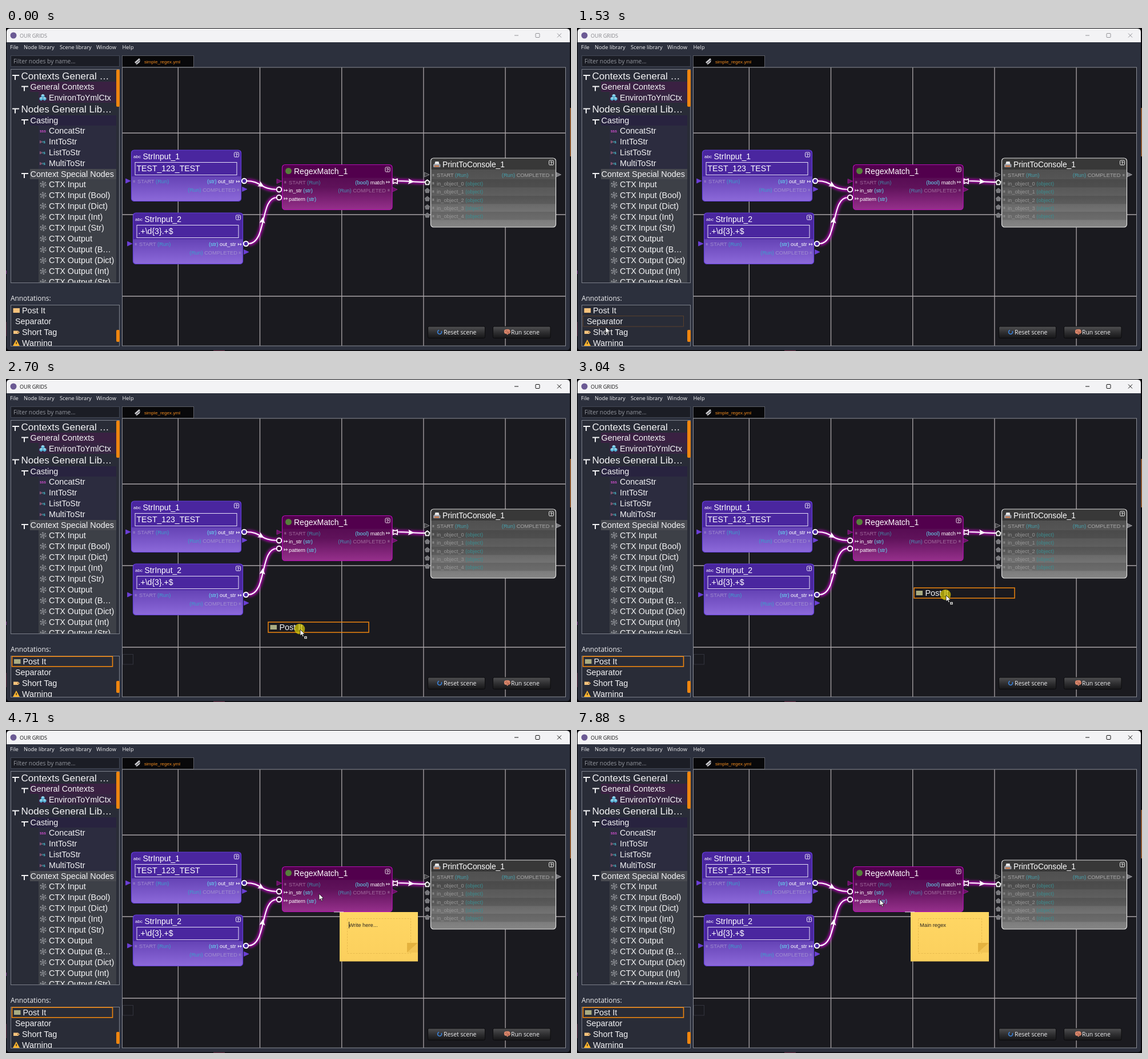
These frames come from a looping animation (989 px wide and 566 px high, 8 s). An HTML page:

```html
<!DOCTYPE html>
<html lang="en">
<head>
<meta charset="utf-8">
<title>Node editor</title>
<style>
  html, body { margin: 0; width: 100%; height: 100%; overflow: hidden; background: #000; }
  svg { display: block; width: 989px; height: 566px; }
  text { font-family: "Liberation Sans", Arial, sans-serif; white-space: pre; }
  .ui { font-family: "Open Sans", "Noto Sans", sans-serif; }
</style>
</head>
<body>
<svg id="stage" viewBox="0 0 989 566" xmlns="http://www.w3.org/2000/svg"></svg>
<script>
const LOOP = 8000, PRESS = 2430, DROP = 3640, FOCUS = 4200;
const stage = document.getElementById('stage');

// Markup helpers
const rect = (x, y, w, h, fill, more = '') =>
  `<rect x="${x}" y="${y}" width="${w}" height="${h}" fill="${fill}" ${more}/>`;
const path = (d, fill = 'none', more = '') => `<path d="${d}" fill="${fill}" ${more}/>`;
const circle = (x, y, r, fill, more = '') => `<circle cx="${x}" cy="${y}" r="${r}" fill="${fill}" ${more}/>`;
const text = (x, y, size, fill, s, more = '') =>
  `<text x="${x}" y="${y}" font-size="${size}" fill="${fill}" ${more}>${s}</text>`;
const ui = (x, y, size, fill, s, more = '') => text(x, y, size, fill, s, 'class="ui" ' + more);
const span = (fill, s) => `<tspan fill="${fill}">${s}</tspan>`;
const at = (x, y, body, more = '') => `<g transform="translate(${x} ${y})" ${more}>${body}</g>`;
const gradient = (id, ...stops) => `<linearGradient id="${id}" x2="0" y2="1">` +
  stops.map((c, i) => `<stop offset="${i / (stops.length - 1)}" stop-color="${c}"/>`).join('') + '</linearGradient>';

const defs = `<defs>
  ${gradient('violet', '#5535a4', '#6442b4', '#8c69da')}
  ${gradient('magenta', '#4e054a', '#5f125a', '#96308c')}
  ${gradient('grey', '#4a4a4a', '#5c5c5c', '#858585')}
  ${gradient('button', '#505052', '#303032', '#161618')}
  ${gradient('paper', '#ffd764', '#fbcf5d')}
  <filter id="glow" x="-60%" y="-60%" width="220%" height="220%" filterUnits="objectBoundingBox">
    <feGaussianBlur stdDeviation="2.6"/></filter>
  <clipPath id="treeClip"><rect x="9" y="73" width="189" height="373"/></clipPath>
</defs>`;

function frame() {
  const menu = [[7, 'File'], [31, 'Node library'], [94, 'Scene library'], [158, 'Window'], [203.5, 'Help']];
  return rect(0, 0, 989, 566, '#08080b') +
    rect(987.5, 140, 1.5, 85, '#b5713c') + rect(0, 425, 1, 6, '#7a2a80') + rect(0, 515, 1, 25, '#4e2030') +
    rect(363, 564.5, 20, 1.5, '#5b2a3c') +
    path('M1 25V7Q1 1 7 1H981Q987 1 987 7V25Z', '#f3f3f5') +
    path('M1 25H987V559Q987 564.5 981 564.5H7Q1 564.5 1 559Z', '#2c303d') +
    circle(13, 13, 5.5, '#6b5a94') +
    menu.map(([x, s]) => ui(x, 37, 9.3, '#f1f1f3', s)).join('') +
    rect(8.5, 48.5, 190, 19, '#1b1d25', 'stroke="#424754"') +
    ui(13, 62, 10.3, '#94979f', 'Filter nodes by name...') +
    rect(203.5, 48.5, 125, 20, '#08080a', 'stroke="#5c5e65"') +
    path('M225 60l8-7 2 2-8 7zM227 63l8-7-1 4-5 4z', '#c9c9cd') +
    text(242, 61.5, 8.1, '#f08a1e', 'simple_regex.yml');
}

const branch = (x, y) => path(`M${x} ${y - 3}h12M${x + 5} ${y - 3}v8`, 'none', 'stroke="#f2f2f4" stroke-width="2"');
const mesh = (x, y) => {
  let d = '';
  for (let i = 0; i < 6; i++) {
    const a = i * Math.PI / 3 + Math.PI / 6;
    d += `M${x} ${y}L${(x + 5.5 * Math.cos(a)).toFixed(1)} ${(y + 5.5 * Math.sin(a)).toFixed(1)}`;
  }
  return path(d, 'none', 'stroke="#8f9196" stroke-width=".8"') +
    circle(x, y, 4.8, 'none', 'stroke="#a0a2a7" stroke-width="1.5" stroke-dasharray="2.4 2.6"') +
    circle(x, y, 2.4, 'none', 'stroke="#8f9196" stroke-width=".8"');
};

function tree() {
  const white = '#f5f5f7';
  let s = rect(8.5, 72.5, 190, 374, '#292c37', 'stroke="#7c808a"');
  s += rect(42, 94, 151, 18, '#3a2142') + rect(57, 112, 136, 19, '#362541') +
    rect(42, 153, 151, 18, '#28233f') + rect(57, 171, 136, 76, '#2c2c3f') +
    rect(42, 247, 151, 18, '#484a50') + rect(57, 265, 136, 181, '#3d4047');
  let body = '';
  [[84, 'Contexts General …'], [142.5, 'Nodes General Lib…']].forEach(([y, t]) =>
    body += branch(11, y + 2) + text(26.5, y + 5.6, 17, white, t));
  [[103.5, 'General Contexts'], [162, 'Casting'], [256, 'Context Special Nodes']].forEach(([y, t]) =>
    body += branch(27, y + 2) + text(42.5, y + 4.6, 14.4, white, t));
  body += text(75, 126.6, 14.2, white, 'EnvironToYmlCtx');
  [[61.5, 124], [67.5, 124], [64.5, 119]].forEach(([x, y]) =>
    body += path(`M${x} ${y - 3}l3 1.5v3l-3 2-3-2v-3z`, '#58b4d8') + path(`M${x} ${y - 3}l3 1.5-3 1.5-3-1.5z`, '#a9e0f2'));
  ['ConcatStr', 'IntToStr', 'ListToStr', 'MultiToStr'].forEach((t, i) => {
    const y = 180 + i * 19;
    body += text(59, y + 2.5, 6.5, '#d04fd0', i ? span('#e8a', 'i›') + span('#4fd0e0', '›s') : 'sss', 'font-weight="bold"') +
      text(75, y + 5, 14.3, white, t);
  });
  ['Input', 'Input (Bool)', 'Input (Dict)', 'Input (Int)', 'Input (Str)', 'Output', 'Output (B…', 'Output (Dict)',
    'Output (Int)', 'Output (Str)'].forEach((t, i) => {
    const y = 274 + i * 19.05;
    body += mesh(65, y) + text(75, y + 5, 14.4, white, 'CTX ' + t);
  });
  return s + `<g clip-path="url(#treeClip)">${body}</g>` + rect(193, 73, 6, 65, '#ee850f', 'rx="2"');
}

function annotations() {
  const row = (i, x, t) => text(x, 499.5 + i * 19.1, 14.4, '#f5f5f7', t);
  return `<clipPath id="listClip">${rect(9, 486, 189, 71, '#000')}</clipPath>` +
    ui(8, 477.5, 11.9, '#f1f1f3', 'Annotations:') + rect(8.5, 485.5, 190, 72, '#292c37', 'stroke="#7c808a"') +
    `<g clip-path="url(#listClip)">` +
    `<g id="item0"><rect id="swatch" x="12.5" y="491" width="11.5" height="8"/>${row(0, 28, 'Post It')}</g>` +
    `<g id="item1">${row(1, 16, 'Separator')}</g>` +
    `<g id="item2">${path('M13 530.5h8l3 2.7-3 2.7h-8z', '#f6c27c') + circle(21, 533.2, 1, '#6b4a20') + row(2, 28, 'Short Tag')}</g>` +
    `<g id="item3">${path('M18 546l6 11H12z', '#ffb52e') + rect(17.4, 550, 1.3, 4, '#222') + row(3, 28, 'Warning')}</g></g>` +
    rect(193, 529, 6, 21, '#ee850f', 'rx="2"') +
    `<rect id="hover" x="10.5" width="176" height="18.5" fill="none" stroke="#8b5523" stroke-dasharray="1 1"/>` +
    `<rect id="picked" x="10.5" y="486.2" width="176" height="17.6" fill="none" stroke="#ee850f" stroke-width="1.6"/>`;
}

// Node parts
const helpMark = (x, y) => rect(x - 4, y - 4, 8, 8, 'none', 'rx="1.5" stroke="#fff" stroke-width=".9"') +
  text(x, y + 2.7, 7.5, '#fff', '?', 'text-anchor="middle" font-weight="bold"');
const box = (x, y, w, h, head, top, fill, stroke) => rect(x, y, w, h, fill, 'rx="5"') +
  path(`M${x} ${y + top}V${y + 5}q0-5 5-5H${x + w - 5}q5 0 5 5V${y + top}z`, head) +
  rect(x, y, w, h, 'none', `rx="5" stroke="${stroke}" stroke-width="1.2"`);
const tri = (x, y, fill, edge = fill) => path(`M${x - 4} ${y - 4}l8.5 4-8.5 4z`, fill, `stroke="${edge}" stroke-width=".8"`);
const halo = (x, y) => circle(x, y, 5.5, '#e000e0', 'filter="url(#glow)" opacity=".7"');
const ring = (x, y, fill) => circle(x, y, 4.2, fill, 'stroke="#fff" stroke-width="2"');
const label = (x, y, name, type, dim, accent, end) => end
  ? text(x, y, 9.3, dim, span(accent, type) + ' ' + name, 'text-anchor="end"')
  : text(x, y, 9.3, dim, name + ' ' + span(accent, type));
const star = (x, y, fill) => path(`M${x} ${y - 1.8}h3.4M${x} ${y + .4}h3.4M${x + 1} ${y - 2.6}v3.8M${x + 2.6} ${y - 2.6}v3.8`,
  'none', `stroke="${fill}" stroke-width=".7"`);
const arrow = (x, y) => path(`M${x} ${y}h5.5M${x} ${y - 2}v4M${x + 3.5} ${y - 1.8}l2 1.8-2 1.8`, 'none', 'stroke="#fff" stroke-width=".9"');

const strNode = (x, y, title, value) => at(x, y,
  box(0, 0, 192, 89.5, '#4a269f', 46, 'url(#violet)', '#6440dc') +
  text(3.5, 13.5, 8, '#fff', 'abc', 'font-family="DejaVu Sans"') + text(20, 16, 14, '#fff', title) + helpMark(184, 8) +
  rect(6.5, 21.5, 178, 22, '#4a269f', 'stroke="#e8e2f8"') + text(9, 37.3, 14.1, '#fff', value) +
  star(3, 55.5, '#9a86cc') + label(10.5, 58.4, 'START', '(Run)', '#a18ed0', '#3aa0cc') +
  label(180, 58.4, 'out_str', '(str)', '#fff', '#64e4f5', true) + arrow(184, 55) +
  label(182.5, 73.2, 'COMPLETED', '(Run)', '#a18ed0', '#3aa0cc', true) + star(185, 70.5, '#9a86cc') +
  tri(-6, 54, '#6b3fd6') + tri(198, 68.5, '#6b3fd6'));

function regexNode() {
  const dim = '#a06a9c', cyan = '#5fdff2';
  return box(483.5, 239.5, 192.5, 79, '#52004d', 23, 'url(#magenta)', '#b40fb2') +
    circle(494.5, 250.5, 5.5, '#55803a') +
    text(504, 256, 14, '#fff', 'RegexMatch_1') + helpMark(668, 248) +
    star(487, 271, dim) + label(495, 274, 'START', '(Run)', dim, '#4088a4') +
    label(663, 274, 'match', '(bool)', '#fff', cyan, true) + arrow(666, 270) +
    arrow(487, 284.5) + label(495, 288, 'in_str', '(str)', '#fff', cyan) +
    label(665, 288, 'COMPLETED', '(Run)', dim, '#4a90b4', true) + star(668, 285, dim) +
    arrow(487, 299) + label(495, 302.5, 'pattern', '(str)', '#fff', cyan) +
    tri(478, 268.5, '#6b1068', '#9c1f98') + tri(680.5, 283, '#6b1068', '#9c1f98');
}

const pentagon = (x, y, fill, more) => path(`M${x} ${y - 4.3}l4 3.1-1.3 5h-5.4l-1.3-5z`, fill, more);

function printNode() {
  const dim = '#989898', teal = '#3b8d90';
  let s = box(743.5, 228, 219, 121, '#383838', 20, 'url(#grey)', '#e2e2e2');
  [265, 294, 322].forEach(y => s += rect(744.5, y, 217, 14.3, '#000', 'opacity=".13"'));
  s += path('M750 239l1.5-5h6l1 5z', '#e8e8e8') + rect(748, 238.5, 12.5, 5.5, '#9b9ea6', 'rx="1"') + rect(750, 241, 8, 2.2, '#c8703e') +
    text(764, 243.6, 13.8, '#fff', 'PrintToConsole_1') + helpMark(954.5, 236) +
    star(746, 258.5, dim) + label(754, 261, 'START', '(Run)', '#a8a8a8', '#44a0ac') +
    label(951.5, 261, 'COMPLETED', '(Run)', '#a8a8a8', '#44a0ac', true) + star(955, 258.5, dim);
  for (let i = 0; i < 5; i++) {
    const y = 272 + i * 14.4;
    s += star(746, y + .8, dim) + label(754, y + 3.7, 'in_object_' + i, '(object)', dim, teal);
    if (i) s += pentagon(737.5, y - 1.5, '#77777b', 'stroke="#98989c" stroke-width=".7"');
  }
  return s + tri(736.5, 257, '#3b3b3e', '#98989c') + tri(967, 257, '#77777b', '#a8a8ac');
}

function wires() {
  const curves = 'M421 268C447 268 446 283 474 283M424 378C457 378 444 297 474 297M686 268C704 268 714 270 733 270';
  return path(curves, 'none', 'stroke="#e800e8" stroke-width="6" filter="url(#glow)" opacity=".8"') +
    path(curves, 'none', 'stroke="#fff" stroke-width="2.1"') +
    [[447, 275.5, 30], [449, 337, -84], [709, 269, 4]].map(([x, y, a]) =>
      path('M5.5 0L-5-5-3 0-5 5z', '#fff', `transform="translate(${x} ${y}) rotate(${a})"`)).join('') +
    ring(417, 268, '#4a269f') + ring(420, 378, '#4a269f') +
    halo(478, 283) + ring(478, 283, '#3a0038') + halo(478, 297) + ring(478, 297, '#3a0038') + halo(681, 268) +
    path('M677.5 264.5l3.5 1.5 4-1.5v8l-4-1.5-3.5 1.5z', '#52004d', 'stroke="#fff" stroke-width="1.8"') +
    pentagon(737.5, 270.5, '#333', 'stroke="#fff" stroke-width="1.8"');
}

function scene() {
  let s = rect(203.5, 69, 776, 488, '#1a1a1f'), d = '';
  for (let i = 0; i < 5; i++) d += `M${301.3 + i * 143.2} 69V557`;
  for (let i = 0; i < 3; i++) d += `M204 ${184 + i * 143}H980`;
  const button = (x, w, tx, t) => rect(x, 523, w, 20.5, 'url(#button)', 'rx="2" stroke="#0c0c0e"') + ui(tx, 537, 10.4, '#f1f1f3', t);
  return s + path(d, 'none', 'stroke="#aaa5a8" stroke-width="1.3"') +
    rect(203.5, 69, 776, 488, 'none', 'stroke="#8b8e96"') +
    `<g id="ghost">${rect(204.5, 482.5, 18, 17.5, 'none', 'stroke="#32333d"')}</g>` +
    strNode(219.5, 214, 'StrInput_1', 'TEST_123_TEST') + strNode(222.5, 324, 'StrInput_2', '.+\\d{3}.+$') +
    regexNode() + printNode() + wires() +
    button(738.5, 100, 766, 'Reset scene') + button(852.5, 100.5, 884, 'Run scene') +
    path('M762 531a3.5 3.5 0 1 1-4-1.5', 'none', 'stroke="#3b82d8" stroke-width="1.6"') +
    path('M872 533q-1-5 4-5 7-1 7 5-1 3-4 3l-1 2-2-2q-4 0-4-3z', '#d9876c') +
    path('M874 532q3-3 4 0t4 0M876 535q2-2 4 0', 'none', 'stroke="#8c4432" stroke-width=".7"');
}

const note = `<g id="note">${rect(584, 319, 137, 86.5, 'url(#paper)')}
  ${rect(597.5, 330.5, 111, 61, 'none', 'stroke="#e3b54a" stroke-width=".8" stroke-dasharray="3 2"')}
  ${path('M702 373h19l-19 17z', '#e4b23f') + path('M702 390l19-17v17z', '#f2c454')}
  <text id="words" x="600" y="345" font-size="9.3" fill="#2a2620"></text>
  ${rect(0, 336, 1, 11.5, '#2a2620', 'id="caret"')}</g>
  <g id="seam">${rect(574, 318.4, 17, 1, '#e8e0e8')}</g>`;

const controls = `<g id="controls" fill="none">${path('M890 13h7M965 9.5l7 7m0-7l-7 7')}${rect(927, 9.5, 7, 7, 'none', 'rx="1"')}</g>`;
const dragged = `<g id="dragged">${rect(0, 0, 176, 18, 'none', 'stroke="#ee850f" stroke-width="1.5"') +
  rect(3.5, 5, 11.5, 8, '#a9ac83') + text(19.5, 14, 14.4, '#f5f5f7', 'Post It')}</g>`;
const pointer = `<g id="pointer"><g id="press">${circle(-1, -1, 9.3, '#d8cc08', 'opacity=".72"')}</g>` +
  path('M0 0V11L2.6 8.6 4.4 12.6 6.2 11.8 4.5 8H8Z', '#fff', 'stroke="#111" stroke-width=".8"') +
  `<g id="badge">${rect(7, 11.5, 5, 5, '#fff', 'stroke="#111" stroke-width=".7"') + path('M9.5 12.5v3M8 14h3', 'none', 'stroke="#111" stroke-width=".8"')}</g></g>`;

stage.innerHTML = defs + frame() + ui(24, 16.5, 9.1, '#000', 'OUR GRIDS', 'id="title"') + controls +
  tree() + annotations() + scene() + note + dragged + pointer;

// Motion
const $ = id => document.getElementById(id);
const show = (id, on) => $(id).setAttribute('display', on ? 'inline' : 'none');
const move = (id, x, y) => $(id).setAttribute('transform', `translate(${x} ${y})`);

const pointerPath = [
  [350, 528, 440], [600, 410, 470], [850, 260, 506], [1130, 161, 522], [1300, 92, 536], [1530, 50, 524],
  [1750, 47, 490], [1930, 57, 469], [2150, 65, 488], [2350, 67, 498], [PRESS, 67, 498], [2600, 330, 468], [2780, 660, 416],
  [2830, 674, 413], [3040, 646, 379], [3230, 619, 355], [3390, 617, 352], [3690, 617, 352], [3990, 625, 344],
  [4300, 625, 344], [4550, 585, 310], [4740, 541, 283], [4880, 530, 296], [6040, 530, 296], [6200, 530, 297]
];
const typing = [[0, 'Write here...'], [5510, 'M'], [5700, 'Ma'], [5830, 'Mai'], [6040, 'Main'], [6170, 'Main '],
  [6680, 'Main r'], [6840, 'Main re'], [7140, 'Main reg'], [7350, 'Main rege'], [7600, 'Main regex']];
const caretOff = [[5240, 5370], [6300, 6680], [7880, LOOP]];
const within = (t, [a, b]) => t >= a && t < b;

function pointerAt(t) {
  const i = pointerPath.findIndex(k => k[0] > t);
  if (i === 0) return pointerPath[0].slice(1);
  if (i < 0) return pointerPath[pointerPath.length - 1].slice(1);
  const [t0, x0, y0] = pointerPath[i - 1], [t1, x1, y1] = pointerPath[i];
  const p = (t - t0) / (t1 - t0);
  return [x0 + (x1 - x0) * p, y0 + (y1 - y0) * p].map(Math.round);
}

function render(t) {
  const [x, y] = pointerAt(t);
  const active = t >= PRESS, dragging = within(t, [PRESS + 60, DROP]);
  const row = t >= 1145 && !active && y >= 486 ? Math.floor((y - 486) / 19.2) : -1;

  $('title').setAttribute('fill', active ? '#111' : '#85858a');
  $('controls').setAttribute('stroke', active ? '#111' : '#929297');
  show('hover', row >= 0);
  $('hover').setAttribute('y', 485.5 + Math.max(row, 0) * 19.1);
  for (let i = 0; i < 4; i++) move('item' + i, active && i === 0 ? 1.5 : row === i ? 1 : 0, 0);
  $('swatch').setAttribute('fill', active ? '#a9ac83' : '#f6c27c');
  show('picked', active);
  show('ghost', t >= 2600);

  show('pointer', t >= 350);
  move('pointer', x, y);
  show('press', within(t, [PRESS, DROP]) || within(t, [4150, 4290]));
  show('badge', dragging && x > 204);
  show('dragged', dragging);
  move('dragged', x - 56, y - 13);

  const written = typing.filter(k => k[0] <= t).pop()[1];
  show('note', t >= DROP);
  show('seam', t >= 4550);
  $('words').textContent = written;
  show('caret', t >= FOCUS && !caretOff.some(r => within(t, r)));
  if (t >= DROP) $('caret').setAttribute('x', 600 + (t < 5510 ? 0 : $('words').getComputedTextLength()));
}

const start = performance.now();
function tick() {
  render((performance.now() - start) % LOOP);
  requestAnimationFrame(tick);
}
tick();
</script>
</body>
</html>
```
